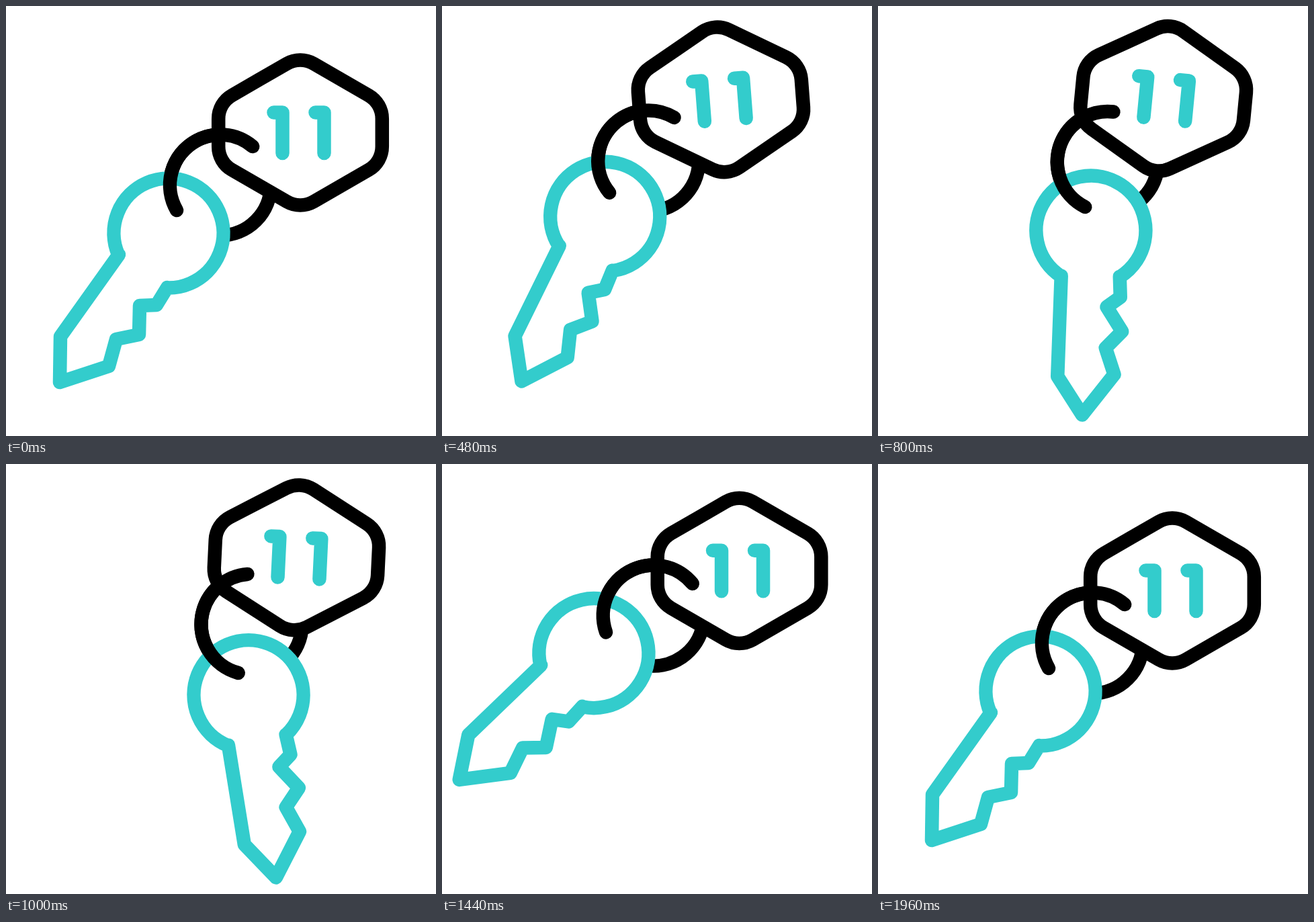
An HTML page with a canvas for the animation above (2000 ms loop, 640 by 640 pixels).

```html
<!DOCTYPE html>
<html lang="en">
<head>
<meta charset="utf-8">
<title>Key with tag</title>
<style>
  html, body { margin: 0; width: 100%; height: 100%; overflow: hidden; background: #fff; }
  canvas { display: block; width: 640px; height: 640px; }
</style>
</head>
<body>
<canvas id="stage"></canvas>
<script>
const LOOP = 2000, STEP = 40;
const INK = '#000', TEAL = '#33cccc', PAPER = '#fff';

const canvas = document.getElementById('stage');
const ctx = canvas.getContext('2d');
const ratio = window.devicePixelRatio || 1;
canvas.width = canvas.height = 640 * ratio;

const smooth = u => u * u * (3 - 2 * u);
const settle = u => 1 - (1 - u) * (1 - u);
const rad = deg => deg * Math.PI / 180;

// Each key: time in ms, value, easing towards it (smooth by default)
const tracks = {
  x: [[80, 0], [520, -19.3], [760, -19], [1200, 0], [1240, 0], [1420, 4.6], [1700, 0]],
  y: [[80, 0], [520, -50.5], [760, -51], [1240, -47.5], [1720, 0]],
  tilt: [[80, 0], [480, -4.4], [800, 5.5], [1200, 0]],
  swing: [[360, 0], [970, -48], [1490, 12.2], [1960, 0, settle]]
};

function valueAt(keys, t) {
  if (t <= keys[0][0]) return keys[0][1];
  for (let i = 1; i < keys.length; i++) {
    const [t0, v0] = keys[i - 1];
    const [t1, v1, ease = smooth] = keys[i];
    if (t < t1) return v0 + (v1 - v0) * ease((t - t0) / (t1 - t0));
  }
  return keys[keys.length - 1][1];
}

// Rest positions on the stage
const TAG = { x: 438, y: 188.5 };
const TILT_Y = 55;
const PIVOT = { x: 375.3, y: 213.9 };
const RING = { x: 319, y: 266.5, r: 75 };
const BOW = { x: 242, y: 338, r: 81.5 };

const bit = [[240, 419], [224, 445], [199, 446], [198, 489], [164, 496],
             [153, 536], [80, 560], [81, 492], [168, 370]];

function tagPath() {
  const w = 121.8, apex = 114.2, side = apex - w * Math.tan(rad(30));
  const corners = [[0, -apex], [w, -side], [w, side], [0, apex], [-w, side], [-w, -side]];
  const p = new Path2D();
  p.moveTo(TAG.x - w / 2, TAG.y - (apex + side) / 2);
  corners.forEach(([x, y], i) => {
    const [nx, ny] = corners[(i + 1) % 6];
    p.arcTo(TAG.x + x, TAG.y + y, TAG.x + nx, TAG.y + ny, 40);
  });
  p.closePath();
  return p;
}

function digitsPath() {
  const p = new Path2D();
  for (const x of [411.5, 473.5]) {
    p.moveTo(x - 13, 158.5);
    p.lineTo(x, 158.5);
    p.lineTo(x, 219);
  }
  return p;
}

function keyPath() {
  const angle = ([x, y]) => Math.atan2(y - BOW.y, x - BOW.x);
  const p = new Path2D();
  p.arc(BOW.x, BOW.y, BOW.r, angle(bit[bit.length - 1]), angle(bit[0]));
  bit.forEach(([x, y]) => p.lineTo(x, y));
  p.closePath();
  return p;
}

function ringPath(from, to) {
  const p = new Path2D();
  p.arc(RING.x, RING.y, RING.r, rad(from), rad(to));
  return p;
}

const tag = tagPath(), digits = digitsPath(), key = keyPath();
const ringBack = ringPath(0, 360), ringFront = ringPath(150, 310);

function rotateAbout(x, y, deg) {
  ctx.translate(x, y);
  ctx.rotate(rad(deg));
  ctx.translate(-x, -y);
}

function draw(path, color, fill) {
  if (fill) {
    ctx.fillStyle = fill;
    ctx.fill(path);
  }
  ctx.strokeStyle = color;
  ctx.stroke(path);
}

function swinging(deg, paint) {
  ctx.save();
  rotateAbout(PIVOT.x, PIVOT.y, deg);
  paint();
  ctx.restore();
}

function render(t) {
  const swing = valueAt(tracks.swing, t);
  ctx.setTransform(ratio, 0, 0, ratio, 0, 0);
  ctx.fillStyle = PAPER;
  ctx.fillRect(0, 0, 640, 640);
  ctx.lineWidth = 20.5;
  ctx.lineCap = ctx.lineJoin = 'round';

  ctx.translate(valueAt(tracks.x, t), valueAt(tracks.y, t));
  rotateAbout(TAG.x, TAG.y + TILT_Y, valueAt(tracks.tilt, t));

  swinging(swing, () => draw(ringBack, INK));
  draw(tag, INK, PAPER);
  draw(digits, TEAL);
  swinging(swing, () => {
    draw(key, TEAL, PAPER);
    draw(ringFront, INK);
  });
}

const start = performance.now();
function tick() {
  const t = (performance.now() - start) % LOOP;
  render(Math.floor(t / STEP) * STEP);
  requestAnimationFrame(tick);
}
tick();
</script>
</body>
</html>
```
